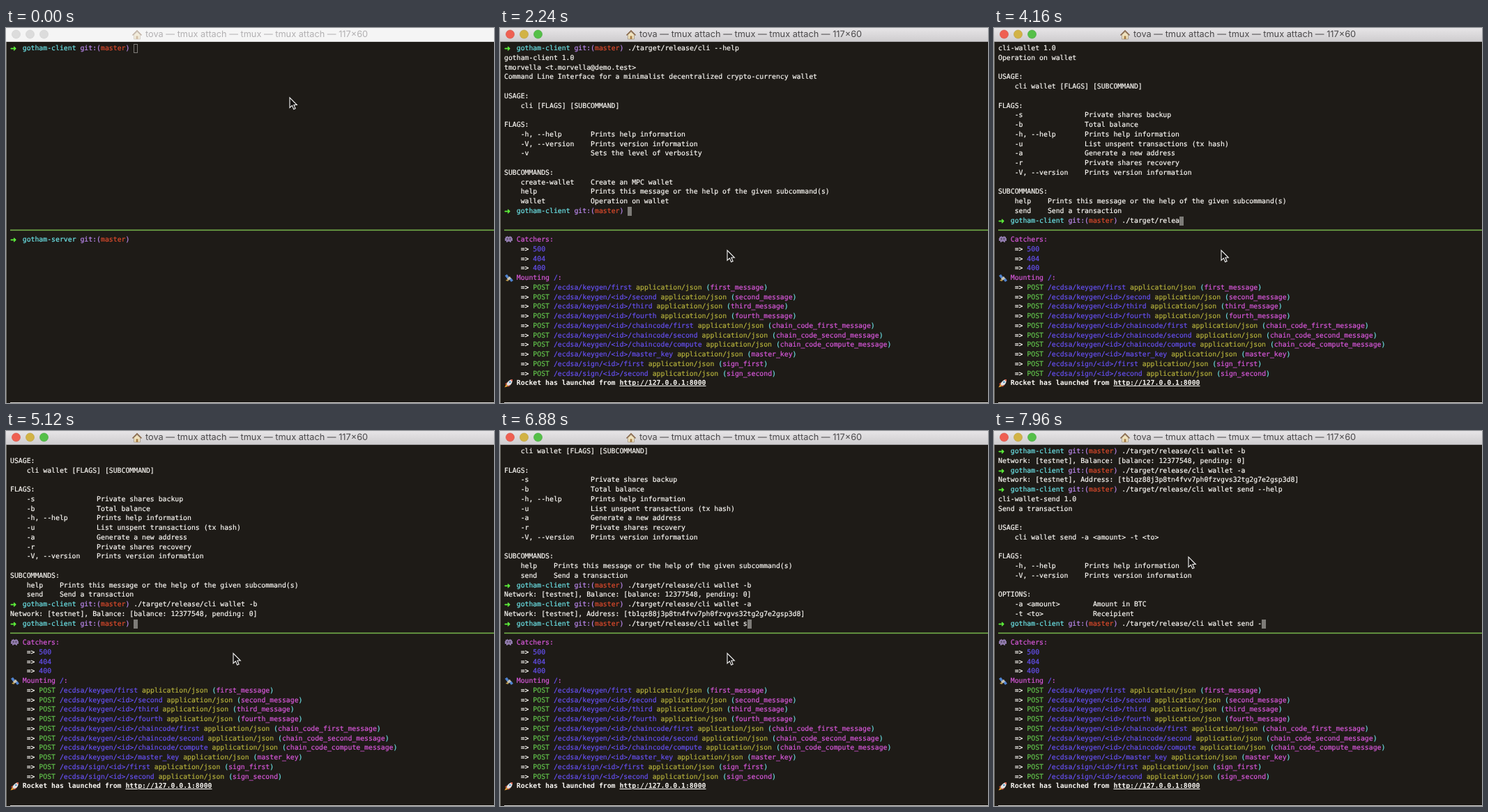
An HTML page that plays this animation: 700x539 px, repeating every 8000 ms.

```html
<!DOCTYPE html>
<html lang="en">
<head>
<meta charset="utf-8">
<title>Terminal session</title>
<style>
html, body { margin: 0; width: 100%; height: 100%; overflow: hidden; background: #1e1b17; }
#stage { position: relative; width: 700px; height: 539px; overflow: hidden; }
#bar { position: absolute; inset: 0 0 auto; height: 20px; box-sizing: border-box;
  background: linear-gradient(#e7e5e7, #cfcdcf); border-bottom: 1px solid #aaa8aa; color: #4b494b;
  font: 12.75px/19px Inter, "Open Sans", sans-serif; white-space: pre; text-rendering: geometricPrecision; }
#bar span { position: absolute; left: 200px; }
.idle #bar { background: #f5f5f5; border-color: #d8d8d8; color: #b2b0b2; }
.idle .light { fill: #dcdcdc; stroke: #cfcfcf; }
.idle #home { opacity: .45; }
pre { position: absolute; left: 6px; margin: 0; color: #fbf9f5; text-rendering: geometricPrecision;
  font: 9.825px/13.75px "DejaVu Sans Mono", "Liberation Mono", monospace; -webkit-text-stroke: .2px; }
#client { top: 23px; }
#server { top: 298px; }
i { font-style: normal; }
.arrow { position: absolute; color: #5ff53c; font: bold 11px/13.75px "DejaVu Sans", sans-serif; }
.cyan { color: #6de6ea; }
.lilac { color: #c08cf5; }
.red { color: #dc4a2c; }
.pink { color: #d958dc; }
.blue { color: #6650f2; }
.green { color: #62c24c; }
.olive { color: #b5b13c; }
.bold, .link { font-weight: bold; -webkit-text-stroke: 0; }
.link { text-decoration: underline; }
.cursor { background: #7d7b77; padding: 1px 0; }
.idle .cursor { background: none; box-shadow: inset 0 0 0 1px #7d7b77; }
svg { position: absolute; left: 0; top: 0; }
</style>
</head>
<body>
<div id="stage" class="idle">
  <div id="bar"><span>tova — tmux attach — tmux — tmux attach — 117×60</span></div>
  <pre id="client"></pre>
  <pre id="server"></pre>
  <svg width="700" height="539" viewBox="0 0 700 539">
    <path d="M.5 20V539" stroke="#77756f"/>
    <path d="M6 290.5H700" stroke="#78b84c" stroke-width="1.300"/>
    <path d="M6 538.5H700" stroke="#d9d7d3"/>
    <g stroke-width=".6">
      <circle class="light" cx="14.5" cy="9" r="6" fill="#ef6052" stroke="#d3483d"/>
      <circle class="light" cx="34.5" cy="9" r="6" fill="#d2b345" stroke="#b89a35"/>
      <circle class="light" cx="54.5" cy="9" r="6" fill="#55c048" stroke="#3da238"/>
    </g>
    <g id="home">
      <path d="M183.500 9.500L188 5.500l4.500 4V16h-9z" fill="#f0e2bd" stroke="#8d8270" stroke-width=".6"/>
      <path d="M181.500 10.500L188 4l6.500 6.500" fill="none" stroke="#8a6a4c" stroke-width="1.600"/>
      <path d="M186.500 11.500h3V16h-3z" fill="#a98048"/>
    </g>
    <g id="icons">
      <path d="M8 300h2v-1h1v1h3v-1h1v1h2v2h1v4h-2v2h-2v-1h-3v1h-2v-2H7v-4h1z" fill="#8d78a8"/>
      <path d="M10 302.500h1.200v1.200H10zm3.800 0H15v1.200h-1.200z" fill="#1e1b17"/>
      <path d="M7 356l3-2 3 4-3 2zM13 361l3-2 3 4-3 2z" fill="#4f83cf"/>
      <path d="M10 360l4-3 2 3-4 3z" fill="#c9c5b8"/>
      <path d="M8 363l3-2 1 3z" fill="#d0a84a"/>
      <path d="M18 505c-4 0-7 3-9 7l3 3c4-2 6-5 6-10z" fill="#e4e2e2"/>
      <path d="M18 505l-3 .6 2.400 2.400zM10 509l-3 3 2 .5zM15 513l-3 3-.5-2z" fill="#d9452f"/>
      <circle cx="14.300" cy="509" r="1.300" fill="#4b8fc4"/>
      <path d="M9 512l-2.500 4.500L11.500 515z" fill="#efa336"/>
    </g>
    <path id="mouse" d="M0 0V14.500L3.400 11.400 5.700 16.700 8.100 15.700 5.900 10.500H10.300Z"
      fill="#141210" stroke="#f5f5f5" stroke-width="1.100"/>
  </svg>
</div>
<script>
const $ = id => document.getElementById(id);
const esc = s => s.replace(/&/g, '&amp;').replace(/</g, '&lt;');
const ink = (cls, s) => `<i class="${cls}">${esc(s)}</i>`;
const clamp = x => Math.min(1, Math.max(0, x));
const ease = x => x * x * (3 - 2 * x);
const prompt = dir => ink('arrow', '➜') + '   ' + ink('cyan', dir) +
  ink('lilac', ' git:(') + ink('red', 'master') + ink('lilac', ')') + ' ';
const cursor = ink('cursor', ' ');

// Help entries: a four-space indent, then the description at a fixed column.
const items = (col, rows) => rows.map(([key, text]) => ('    ' + key).padEnd(col) + text).join('\n');
const helpFlag = ['-h, --help', 'Prints help information'];
const versionFlag = ['-V, --version', 'Prints version information'];
const helpCommand = ['help', 'Prints this message or the help of the given subcommand(s)'];

const cliHelp = `gotham-client 1.0
tmorvella <t.morvella@demo.test>
Command Line Interface for a minimalist decentralized crypto-currency wallet

USAGE:
    cli [FLAGS] [SUBCOMMAND]

FLAGS:
${items(21, [helpFlag, versionFlag, ['-v', 'Sets the level of verbosity']])}

SUBCOMMANDS:
${items(21, [['create-wallet', 'Create an MPC wallet'], helpCommand, ['wallet', 'Operation on wallet']])}`;

const walletHelp = `cli-wallet 1.0
Operation on wallet

USAGE:
    cli wallet [FLAGS] [SUBCOMMAND]

FLAGS:
${items(21, [['-s', 'Private shares backup'], ['-b', 'Total balance'], helpFlag,
  ['-u', 'List unspent transactions (tx hash)'], ['-a', 'Generate a new address'],
  ['-r', 'Private shares recovery'], versionFlag])}

SUBCOMMANDS:
${items(12, [helpCommand, ['send', 'Send a transaction']])}`;

const sendHelp = `cli-wallet-send 1.0
Send a transaction

USAGE:
    cli wallet send -a <amount> -t <to>

FLAGS:
${items(21, [helpFlag, versionFlag])}

OPTIONS:
${items(23, [['-a <amount>', 'Amount in BTC'], ['-t <to>', 'Receipient']])}`;

// Typing from, typing to, enter pressed, output shown (ms)
const session = [
  [1200, 1960, 2040, 2080, '--help', cliHelp],
  [2320, 3120, 3200, 3280, 'wallet --help', walletHelp],
  [3720, 4640, 4720, 4800, 'wallet -b', 'Network: [testnet], Balance: [balance: 12377548, pending: 0]'],
  [5120, 5920, 5980, 6040, 'wallet -a', 'Network: [testnet], Address: [tb1qz88j3p8tn4fvv7ph0fzvgvs32tg2g7e2gsp3d8]'],
  [6200, 7100, 7160, 7240, 'wallet send --help', sendHelp],
  [7340, 7950, 9000, 9000, 'wallet send -', '']
];

function clientPane(t) {
  let log = '';
  for (const [from, to, enter, shown, args, output] of session) {
    const cmd = './target/release/cli ' + args;
    log += prompt('gotham-client') + esc(cmd.slice(0, Math.floor(clamp((t - from) / (to - from)) * cmd.length)));
    if (t < enter) break;
    log += '\n';
    if (t < shown) break;
    log += esc(output) + '\n';
  }
  return (log + cursor).split('\n').slice(-19).join('\n');
}

const route = ([path, name]) => ink('bold', '    => ') + ink('green', 'POST ') +
  ink('blue', '/ecdsa/' + path) + ink('olive', ' application/json ') +
  ink('cyan', '(') + ink('pink', name) + ink('cyan', ')');

const launched = [
  '   ' + ink('pink', 'Catchers:'),
  ...['500', '404', '400'].map(code => ink('bold', '    => ') + ink('blue', code)),
  '   ' + ink('pink', 'Mounting ') + ink('blue', '/') + ink('pink', ':'),
  ...[
    ...['first', 'second', 'third', 'fourth'].map((n, i) => [`keygen/${i ? '<id>/' : ''}${n}`, n + '_message']),
    ...['first', 'second', 'compute'].map(n => ['keygen/<id>/chaincode/' + n, `chain_code_${n}_message`]),
    ['keygen/<id>/master_key', 'master_key'],
    ...['first', 'second'].map(n => ['sign/<id>/' + n, 'sign_' + n])
  ].map(route),
  '   ' + ink('bold', 'Rocket has launched from ') + ink('link', 'http://127.0.0.1:8000')
].join('\n');

const launchTime = 680;

function mouseAt(t) {
  const a = ease(clamp((t - 280) / 360)), b = ease(clamp((t - 7680) / 260));
  return [407 - 81 * a - 47 * b, 100 + 219.5 * a - 138.5 * b];
}

const shownHtml = {};
function show(id, html) {
  if (shownHtml[id] !== html) $(id).innerHTML = shownHtml[id] = html;
}

let start;
function draw(now) {
  start ??= now;
  const t = (now - start) % 8000;
  $('stage').className = t < 40 ? 'idle' : '';
  show('client', clientPane(t));
  show('server', t < launchTime ? prompt('gotham-server') : launched);
  $('icons').style.display = t < launchTime ? 'none' : '';
  $('mouse').setAttribute('transform', `translate(${mouseAt(t)})`);
  requestAnimationFrame(draw);
}
requestAnimationFrame(draw);
</script>
</body>
</html>
```
